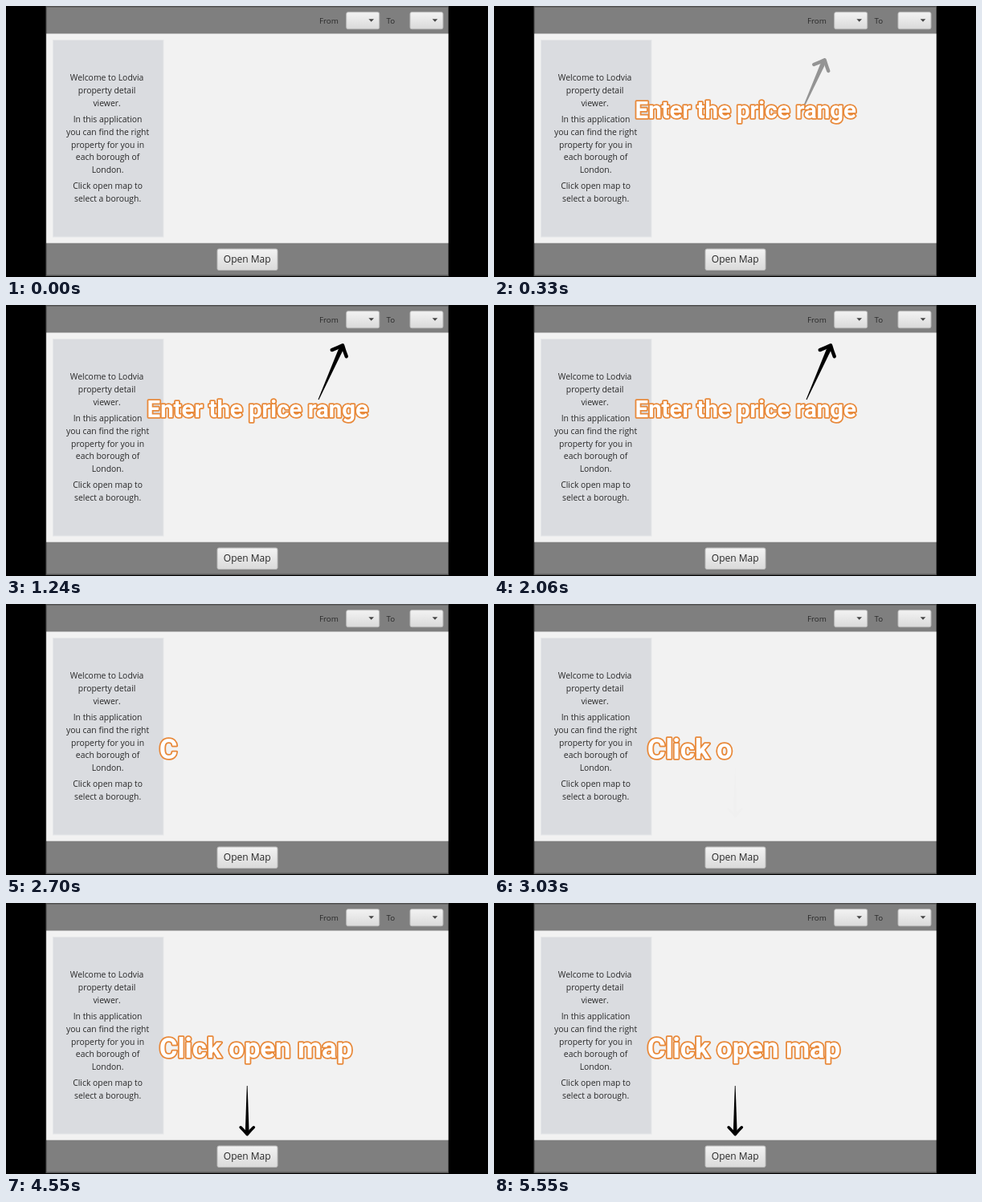
Write an HTML page that moves like this. It is 600 px wide and 338 px high and loops after 5640 ms.

```html
<!DOCTYPE html>
<html lang="en">
<head>
<meta charset="utf-8">
<title>Property viewer guide</title>
<style>
  html, body { margin: 0; width: 100%; height: 100%; overflow: hidden; background: #000; }
  svg { display: block; width: 600px; height: 338px; }
  .ui { font-family: "Open Sans", "Noto Sans", sans-serif; fill: #282828; }
  .intro { font-size: 10.4px; text-anchor: middle; }
  .label { font-size: 9.8px; }
  .callout {
    font-family: Roboto, Arial, sans-serif; font-weight: 700; fill: #fff;
    stroke: #e8893a; stroke-width: 3.6px; stroke-linejoin: round; paint-order: stroke;
  }
</style>
</head>
<body>
<svg viewBox="0 0 600 338">
  <defs>
    <linearGradient id="face" x2="0" y2="1">
      <stop offset="0" stop-color="#f3f3f3"/>
      <stop offset="1" stop-color="#dadada"/>
    </linearGradient>
    <!-- tip at 0,0, pointing down -->
    <g id="arrow">
      <path d="M-.4-62.5H.4L2.3-8 1.6-2H-1.6L-2.3-8Z"/>
      <path d="M-8.1-10.6Q-4-6.5 0-1.8Q4-6.5 8.1-10.6" fill="none" stroke="#000"
            stroke-width="3.6" stroke-linecap="round" stroke-linejoin="round"/>
    </g>
    <g id="combo">
      <rect x=".5" y=".5" width="41" height="21" rx="2" fill="url(#face)" stroke="#bababa"/>
      <path d="M28.2 9h6.6l-3.3 3.5z" fill="#444"/>
    </g>
  </defs>

  <rect width="600" height="338"/>
  <rect x="49.5" width="501.5" height="337" fill="#505050"/>
  <rect x="50.6" y="1.5" width="499.6" height="334" fill="#7f7f7f"/>
  <rect x="50.2" y="34.5" width="500.4" height="261.2" fill="#f2f2f2"/>
  <rect x="58" y="42" width="138.5" height="246.5" fill="#e6e7e9"/>
  <rect x="59" y="43" width="136.5" height="244.5" fill="#dadce0"/>

  <g class="ui label">
    <text x="390" y="22.3">From</text>
    <text x="473.5" y="22.3">To</text>
  </g>
  <use href="#combo" x="423.2" y="7.2"/>
  <use href="#combo" x="502.5" y="7.2"/>

  <g class="ui intro" id="intro"></g>

  <rect x="263" y="303" width="75" height="26.5" rx="2" fill="url(#face)" stroke="#bababa"/>
  <text class="ui" x="300.2" y="320.4" font-size="12" text-anchor="middle">Open Map</text>

  <g id="steps"></g>
</svg>
<script>
const NS = "http://www.w3.org/2000/svg";
const LOOP = 5640;
const LEADING = 15.8;

const intro = [
  { x: 125.6, y: 93.2, lines: ["Welcome to Lodvia", "property detail", "viewer."] },
  { x: 126.6, y: 145, lines: ["In this application", "you can find the right",
    "property for you in", "each borough of", "London."] },
  { x: 126.6, y: 228.4, lines: ["Click open map to", "select a borough."] }
];

// Times in ms: from/to of the step, first letter, time per letter, arrow slide
const steps = [
  { text: "Enter the price range", x: 175.6, y: 140.3, size: 29.4,
    from: 0, to: 2520, type: 30, pace: 13.5,
    slide: [200, 1120], place: "translate(420 48.3) rotate(204) scale(1.22)" },
  { text: "Click open map", x: 190.7, y: 193, size: 34.7,
    from: 2520, to: LOOP, type: 2670, pace: 60,
    slide: [3030, 3760], place: "translate(300.2 290.4)" }
];

function add(parent, name, attrs) {
  const el = document.createElementNS(NS, name);
  for (const key in attrs) el.setAttribute(key, attrs[key]);
  return parent.appendChild(el);
}

for (const { x, y, lines } of intro) {
  lines.forEach((line, i) => {
    const text = add(document.getElementById("intro"), "text", { x, y: y + i * LEADING });
    text.textContent = line;
  });
}

for (const s of steps) {
  s.group = add(document.getElementById("steps"), "g", {});
  const holder = add(s.group, "g", { transform: s.place });
  s.arrow = add(holder, "use", { href: "#arrow" });
  s.label = add(s.group, "text", { class: "callout", x: s.x, y: s.y, "font-size": s.size });
}

const clamp = v => Math.min(1, Math.max(0, v));

function draw(t) {
  for (const s of steps) {
    const on = t >= s.from && t < s.to;
    s.group.style.display = on ? "" : "none";
    if (!on) continue;
    const count = Math.max(0, Math.floor((t - s.type) / s.pace) + 1);
    s.label.textContent = s.text.slice(0, count);
    const [start, end] = s.slide;
    const p = clamp((t - start) / (end - start));
    s.arrow.setAttribute("y", -24 * (1 - p) ** 3);
    s.arrow.setAttribute("opacity", clamp(p * 2.7));
  }
}

const begin = performance.now();
function tick() {
  draw((performance.now() - begin) % LOOP);
  requestAnimationFrame(tick);
}
tick();
</script>
</body>
</html>
```
